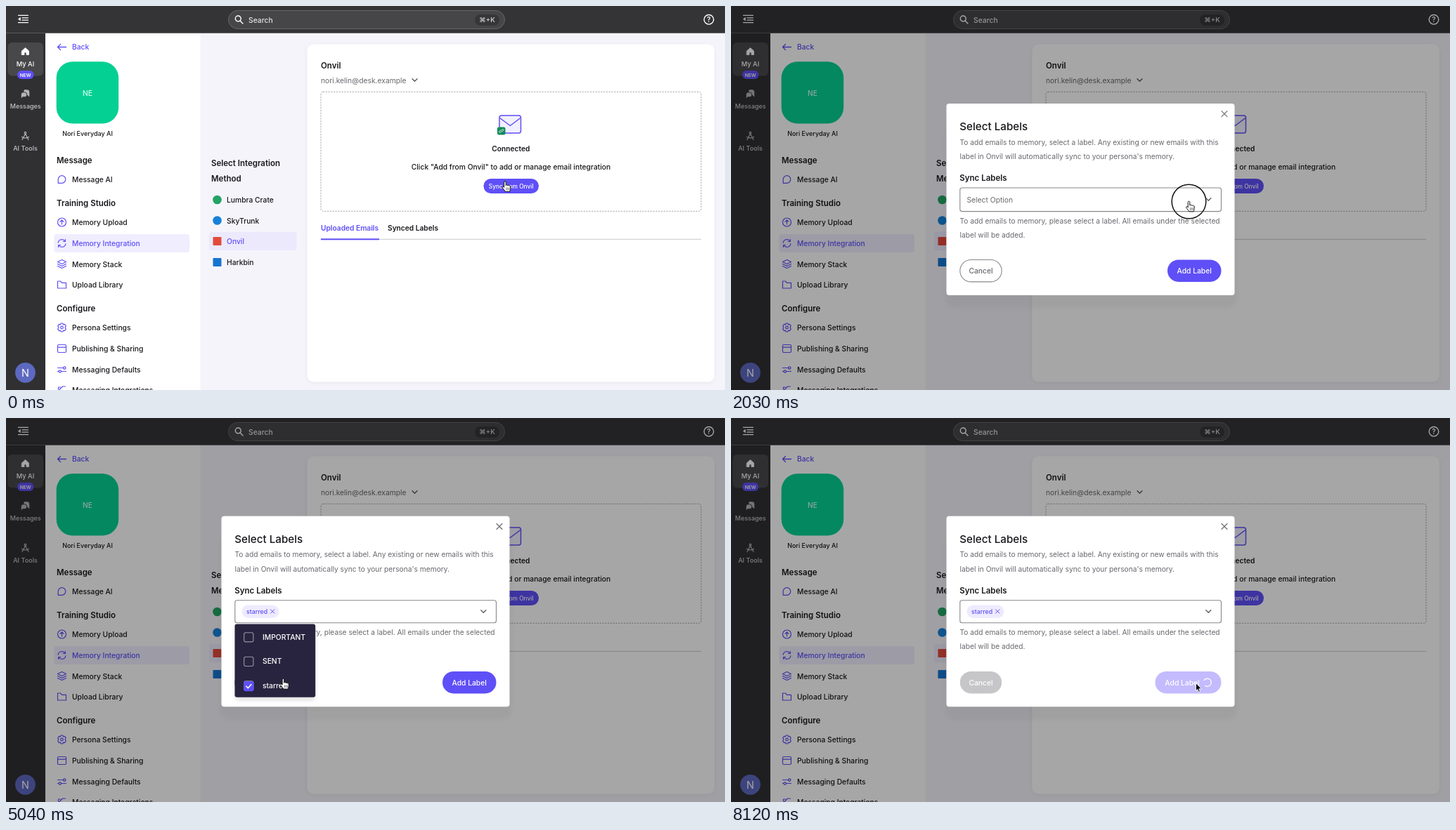
These frames come from a looping animation (1023x547 px, 8190 ms). An HTML page:

```html
<!DOCTYPE html>
<html lang="en">
<head>
<meta charset="utf-8">
<title>Label sync</title>
<style>
html, body { margin: 0; width: 100%; height: 100%; overflow: hidden; background: #f5f4fb; }
svg { display: block; width: 100vw; height: 100vh; font-family: Inter, Roboto, sans-serif; }
text { white-space: pre; }
.blur { filter: blur(3px); }
</style>
</head>
<body>
<svg viewBox="0 0 1023 547" preserveAspectRatio="none">
  <g id="page"></g>
  <g id="dialog"></g>
  <g id="pointer"></g>
</svg>
<script>
const LOOP = 8190, TICK = 70;
const PURPLE = '#5f4ff7', INK = '#18181c', GREY = '#68686e', PALE = '#c3bbfd', EDGE = '#88888d';

// y is the vertical middle of the capitals
const text = (x, y, s, size = 10.3, fill = INK, weight = 450, anchor = 'start') =>
  `<text x="${x}" y="${y + size * .36}" font-size="${size}" fill="${fill}" font-weight="${weight}" text-anchor="${anchor}">${s}</text>`;
const mid = (x, y, s, size, fill, weight) => text(x, y, s, size, fill, weight, 'middle');
const note = (y, s) => text(325.5, y, s, 10.22, GREY, 400);
const rect = (x, y, w, h, r, fill, more = '') =>
  `<rect x="${x}" y="${y}" width="${w}" height="${h}" rx="${r}" fill="${fill}" ${more}/>`;
const circle = (x, y, r, fill, more = '') => `<circle cx="${x}" cy="${y}" r="${r}" fill="${fill}" ${more}/>`;
const line = (x, y, d, stroke = PURPLE, width = 1.2, fill = 'none') =>
  `<path transform="translate(${x} ${y})" d="${d}" fill="${fill}" stroke="${stroke}" stroke-width="${width}" stroke-linecap="round" stroke-linejoin="round"/>`;
const chevron = (x, y, color) => line(x, y, 'M-3.5-1.8 0 1.8 3.5-1.8', color, 1.3);
const cross = (x, y, r, color, width) => line(x, y, `M${-r} ${-r} ${r} ${r}M${r} ${-r} ${-r} ${r}`, color, width);
const spinner = (x, y, color, age) =>
  `<g transform="translate(${x} ${y}) rotate(${age / 750 * 360})">${line(0, 0, 'M4-4A5.6 5.6 0 1 0 4 4', color, 1.3)}</g>`;

const icons = {
  bubble: 'M-5.3 5.3V0A5.3 5.3 0 1 1 0 5.3z',
  upload: 'M-6 0A6 6 0 1 1 6 0 6 6 0 1 1-6 0M0 3V-3M-2.5-.7 0-3.2 2.5-.7',
  sync: 'M-5.3-.8A5.3 5.3 0 0 1 4.5-2.8M4.9-5.5V-2.5H1.9M5.3.8A5.3 5.3 0 0 1-4.5 2.8M-4.9 5.5V2.5H-1.9',
  stack: 'M0-6 6-3 0 0-6-3zM-6 0 0 3 6 0M-6 3 0 6 6 3',
  folder: 'M-6 5V-5H-2L0-2.7H6V5z',
  gear: 'M-1.3-6H1.3L2-4.2 4-4.7 5.8-2.2 4.6 0 5.8 2.2 4 4.7 2 4.2 1.3 6H-1.3L-2 4.2-4 4.7-5.8 2.2-4.6 0-5.8-2.2-4-4.7-2-4.2zM-1.8 0A1.8 1.8 0 1 1 1.8 0 1.8 1.8 0 1 1-1.8 0',
  panel: 'M-4.5-5.5H4.5Q6-5.5 6-4V4Q6 5.5 4.5 5.5H-4.5Q-6 5.5-6 4V-4Q-6-5.5-4.5-5.5M-6-1.8H6',
  sliders: 'M-6-2.5H2M-1 2.5H6M-6 2.5H-4.5M2-2.5A1.7 1.7 0 1 1 5.4-2.5 1.7 1.7 0 1 1 2-2.5M-4.5 2.5A1.7 1.7 0 1 1-1.1 2.5 1.7 1.7 0 1 1-4.5 2.5',
  link: 'M-5 5V1L1-5H5M-1 5H3L6 2M-5-1V-4H-2'
};

function drawPage() {
  const nav = [
    [247, 'bubble', 'Message AI'], [308, 'upload', 'Memory Upload'],
    [338, 'sync', 'Memory Integration'], [367.5, 'stack', 'Memory Stack'],
    [397, 'folder', 'Upload Library'], [458, 'gear', 'Persona Settings'],
    [488, 'panel', 'Publishing &amp; Sharing'], [518, 'sliders', 'Messaging Defaults'],
    [547, 'link', 'Messaging Integrations']
  ];
  const heads = [[220, 'Message'], [281, 'Training Studio'], [431, 'Configure']];
  return [
    rect(0, 0, 1023, 547, 0, '#f5f4fb'),
    rect(56, 38, 220.5, 509, 0, '#fff'),
    rect(428, 56, 580, 481, 10, '#000', 'opacity=".05" class="blur"'),
    rect(428.5, 54.5, 579.5, 481, 9, '#fff'),

    // header
    rect(0, 0, 1023, 38.7, 0, '#343437'),
    line(24.5, 18.5, 'M-7-5.2H7M-1.5-1.7H7M-1.5 1.7H7M-7 5.2H7', '#fff', 1.3),
    line(24.5, 18.5, 'M-7 0-4-2.2V2.2z', '#fff', .5, '#fff'),
    rect(316.5, 6.5, 393, 26, 13, '#464649', 'stroke="#68686b"'),
    line(331, 19, 'M-4.7-1A4 4 0 1 1 3.3-1 4 4 0 1 1-4.7-1M2.3 2.2 6 6', '#fff', 1.4),
    text(345, 20, 'Search', 10.3, '#e4e4e6'),
    rect(667, 12, 35, 16, 8, '#363639'),
    mid(684.5, 20, '⌘+K', 9.6, '#d8d8da'),
    circle(1000, 19.3, 6.8, 'none', 'stroke="#fff" stroke-width="1.4"'),
    mid(1000, 19.5, '?', 10, '#fff', 600),

    // rail
    rect(0, 38.7, 56, 509, 0, '#303033'),
    rect(2.5, 52, 50.5, 47.5, 6, '#48484b'),
    line(27.5, 64.5, 'M-5-.5 0-5 5-.5V5H1.5V1.5H-1.5V5H-5z', '#fff', .8, '#fff'),
    mid(27.5, 82.5, 'My AI', 9.3, '#fff', 500),
    rect(16, 92, 23.5, 12, 6, PURPLE),
    mid(27.7, 98.2, 'NEW', 6.7, '#fff', 600),
    line(27.5, 125, 'M-1-5.5H2.5Q5.5-5.5 5.5-2.5V4L3.5 2H3Q3-2.5-2-3-2-5.5-1-5.5M-5.5 5.5V1Q-5.5-1.5-3-1.5H-1.5Q1.5-1.5 1.5 1.5T-1.5 4H-4z', '#b4b4b7', .5, '#b4b4b7'),
    mid(27.7, 142.5, 'Messages', 9, '#c2c2c5'),
    line(27.5, 185, 'M-4.5 5.5 0-3 4.5 5.5M-5 1.5Q0 4.5 5 1.5M-1.3-4.3A1.3 1.3 0 1 1 1.3-4.3 1.3 1.3 0 1 1-1.3-4.3', '#b4b4b7', 1.2),
    mid(27.5, 202.5, 'AI Tools', 9.1, '#c2c2c5'),
    circle(27.5, 522.3, 14.4, '#5d69c0'),
    mid(27.5, 522.5, 'N', 14.5, '#fff', 400),

    // persona menu
    line(79.5, 58.5, 'M6 0H-6M-2-4-6 0-2 4', PURPLE, 1.3),
    text(94, 58.7, 'Back', 10.3, PURPLE),
    rect(71.7, 79.2, 88.5, 88.3, 23, '#04d093'),
    mid(116, 124, 'NE', 10.2, '#d8fff0', 500),
    mid(116, 182, 'Nori Everyday AI', 9, INK, 500),
    heads.map(([y, s]) => text(72, y, s, 11.5, INK, 600)).join(''),
    rect(68.5, 325, 192.5, 26, 4, '#efedfe'),
    nav.map(([y, icon, s]) => line(79.5, y, icons[icon]) +
      text(94, y + .5, s, 10.3, y == 338 ? PURPLE : INK)).join(''),

    // integration methods
    text(292, 224, 'Select Integration', 11.5, INK, 600),
    text(292, 245.5, 'Method', 11.5, INK, 600),
    rect(289, 321.7, 124.5, 26.3, 4, '#ece9fd'),
    circle(300.5, 276, 6.3, '#22a464'),
    circle(300.5, 305.5, 6.3, '#1681d8'),
    rect(294.5, 329, 12, 12, 1, '#e24a3c'),
    rect(294.5, 359, 12, 12, 1, '#1674cf'),
    text(314, 276, 'Lumbra Crate'),
    text(314, 306, 'SkyTrunk'),
    text(314, 335.5, 'Onvil', 10.3, PURPLE),
    text(314, 365, 'Harkbin'),

    // mail card
    text(448, 85, 'Onvil', 11.5, INK, 600),
    text(448, 106, 'nori.kelin@desk.example', 10.3, GREY, 400),
    chevron(581.5, 105.5, '#55555b'),
    rect(448, 122.3, 541, 170, 3, 'none', 'stroke="#a4a4a8" stroke-dasharray="2.2 1.6"'),
    rect(702, 156, 30.5, 25, 3, '#f2f0fe', `stroke="${PURPLE}" stroke-width="1.5"`),
    line(717.3, 164, 'M-14-4 0 6.5 14-4', PURPLE, 1.5),
    rect(699, 172.5, 11.5, 11, 2.5, '#108a5a'),
    line(704.7, 178, 'M-.5 1.5-1.5 2.5A1.3 1.3 0 0 1-3 .5L-1-1.2M.5-1.5 1.5-2.5A1.3 1.3 0 0 1 3-.5L1 1.2M-1 1 1-1', '#fff', .8),
    mid(718.3, 203.2, 'Connected', 10.2, INK, 600),
    mid(718.5, 229.7, 'Click "Add from Onvil" to add or manage email integration'),
    rect(679.5, 246, 78.5, 21, 10.5, PURPLE),
    mid(718.7, 256.7, 'Sync from Onvil', 8.4, '#fff', 500),
    rect(448, 331.8, 541, 1, 0, '#c9c9cd'),
    rect(448, 331.3, 83, 2, 0, PURPLE),
    text(448, 316, 'Uploaded Emails', 10.2, PURPLE, 600),
    text(543, 316, 'Synced Labels', 10.2, INK, 600)
  ].join('');
}

function drawMenu(t, low) {
  const pick = Math.max(0, Math.min(1, (t - 3990) / 280));
  const rows = ['IMPORTANT', 'SENT', 'starred'].map((s, i) => {
    const y = 312.7 + 34.6 * i - low;
    return rect(338.7, y - 6.2, 13.2, 13.2, 2.5, 'none', 'stroke="#9794a8" stroke-width="1.1"') +
      text(365, y, s, 10.3, '#fff', 500);
  }).join('');
  const mark = `<g opacity="${pick}">${rect(338.2, 375, 14.2, 14.2, 2.5, PURPLE)}${line(345.3, 382, 'M-3.5 0-1 2.7 3.7-2.5', '#fff', 1.5)}</g>`;
  return rect(326, 299, 114, 103, 5, '#000', 'opacity=".12" class="blur"') +
    rect(325.5, 294.3 - low, 114.7, 104.2, 3, '#28243f') + rows + (pick ? mark : '');
}

function drawDialog(t) {
  if (t < 560) return '';
  const loading = t < 1400, chosen = t >= 4060, saving = t >= 7770;
  const low = chosen ? .8 : 0;  // the picked chip makes the dialog slightly shorter
  const top = 139 + low, bottom = 412 - low, selectW = loading ? 352 : 372;
  const out = [
    rect(0, 0, 1023, 547, 0, '#000', 'opacity=".35"'),
    rect(305, 166, 415, 264, 14, '#000', 'opacity=".03" class="blur"'),
    rect(306.5, top, 410, bottom - top, 4, '#fff'),
    cross(702, 153.7 + low, 4, '#6a6a70', 1.1),
    text(325.3, 171.7 + low, 'Select Labels', 15.2, INK, 500),
    note(194 + low, 'To add emails to memory, select a label. Any existing or new emails with this'),
    note(214.3 + low, "label in Onvil will automatically sync to your persona's memory."),
    text(325.3, 244.8 + low, 'Sync Labels', 11.5, INK, 600),
    rect(325.8, 259 + low, selectW - .3, 33.6 - 2 * low, 3, '#fff', `stroke="${EDGE}" stroke-width="1.1"`),
    chevron(loading ? 659.5 : 679.3, 275.5, '#5a5a60'),
    note(306.5 - low, 'To add emails to memory, please select a label. All emails under the selected'),
    note(326.5 - low, 'label will be added.')
  ];
  if (chosen) out.push(
    rect(335.5, 266.5, 53, 18.5, 9.2, '#eeebfe'),
    text(342, 275.8, 'starred', 8.8, PURPLE),
    cross(379.2, 275.5, 2.7, PURPLE, 1));
  else out.push(text(335.5, 276, 'Select Option', 10.3, GREY, 400));
  if (loading) out.push(spinner(691.3, 275.5, '#66666b', t - 560));

  const y = 361.5 - low * .6, h = 31.4;
  out.push(
    rect(325.8, y, 59.4, h, h / 2, saving ? '#c6c6c8' : '#fff', saving ? '' : `stroke="${EDGE}" stroke-width="1.1"`),
    mid(355.5, y + 15.9, 'Cancel', 10.3, saving ? '#fff' : GREY));
  if (saving) out.push(
    rect(603.5, y, 94, h, h / 2, PALE),
    mid(642, y + 15.9, 'Add Label', 10.3, '#fff', 500),
    spinner(677.8, y + 15.7, '#fff', t - 7770));
  else out.push(
    rect(621, y, 76.5, h, h / 2, loading ? PALE : PURPLE),
    mid(659.2, y + 15.9, 'Add Label', 10.3, '#fff', 500));
  if (t >= 2170 && t < 5600) out.push(drawMenu(t, low));
  return out.join('');
}

const path = [
  [0, 710, 250], [140, 710, 262], [1330, 710, 262], [1680, 651.5, 278.5],
  [2450, 651.5, 278.5], [3360, 354, 374.5], [3710, 346.5, 379.5],
  [4830, 346.5, 379.5], [5390, 498, 355], [5530, 498, 355], [5600, 505.5, 356],
  [6790, 505.5, 356], [7350, 661.5, 378], [LOOP, 661.5, 378]
];
const clicks = [
  [420, 560, 708.5, 262.5], [2030, 2170, 651.5, 278.5], [3920, 4060, 346.5, 379.5],
  [5390, 5600, 498, 356], [7560, 7770, 660.5, 377.5]
];
const HAND = 'M-1.3 8V1A1.3 1.3 0 0 1 1.3 1V5.5C1.6 4.6 3.5 4.6 3.7 5.8 4.2 5.1 5.7 5.2 5.9 6.3 6.6 5.7 7.8 6.1 7.8 7.3V10C7.8 12 7 12.5 6.8 14.3H.2C-.3 12.4-2.6 10.8-3.7 8.8-4.3 7.6-2.9 6.6-2 7.5z';
const ARROW = 'M0 0V10.7L2.4 8.5 4 12.3 5.9 11.5 4.3 7.8H7.6z';

function drawPointer(t) {
  const i = path.findIndex(p => p[0] > t);
  const [a, b] = [path[i - 1], path[i]];
  const p = (t - a[0]) / (b[0] - a[0]), e = p * p * (3 - 2 * p);
  const x = a[1] + (b[1] - a[1]) * e, y = a[2] + (b[2] - a[2]) * e;
  const arrow = t >= 5110 && t < 7200 || t >= 7770;
  const ring = clicks.find(c => t >= c[0] && t < c[1]);
  return (ring ? circle(ring[2], ring[3], 24.3, 'none', 'stroke="#111" stroke-width="1.5"') : '') +
    (arrow ? line(x, y, ARROW, '#fff', .9, '#000')
      : line(x, y, HAND, '#111', 1, '#fff') + line(x, y, 'M2 9V12M4 9V12M6 9V12', '#111', .6));
}

const layer = id => document.getElementById(id);
layer('page').innerHTML = drawPage();
let last = -1;
function frame(now) {
  const t = Math.floor(now % LOOP / TICK) * TICK;
  if (t !== last) {
    layer('dialog').innerHTML = drawDialog(t);
    layer('pointer').innerHTML = drawPointer(t);
    last = t;
  }
  requestAnimationFrame(() => frame(performance.now() - start));
}
const start = performance.now();
frame(0);
</script>
</body>
</html>
```
